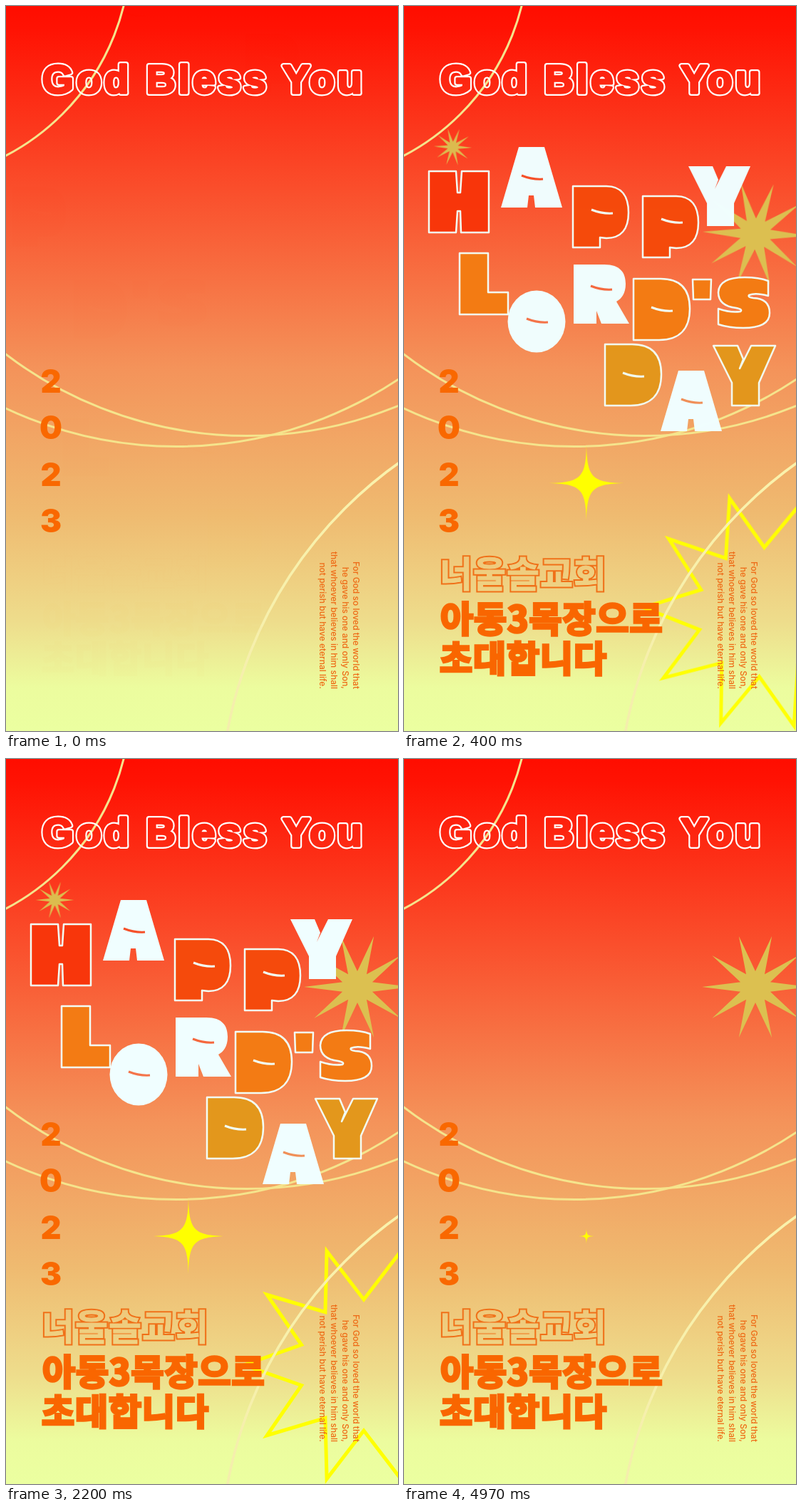
Animation, 550 px wide and 1018 px high, one loop 5.01 s. Source, as an HTML page:

```html
<!DOCTYPE html>
<html lang="ko">
<head>
<meta charset="utf-8">
<title>Happy Lord's Day</title>
<style>
  html, body { margin: 0; width: 100%; height: 100%; overflow: hidden; background: #ff0e00; }
  svg { display: block; width: 100vw; height: 100vh; }

  .arc { fill: none; stroke: #f5e48c; stroke-width: 3; }
  .title { font: bold 56px "Liberation Sans", Arial, sans-serif; letter-spacing: 4.6px; text-anchor: middle; stroke-linejoin: round; }
  .year { font: 900 45px Inter, "Noto Sans", sans-serif; text-anchor: middle; fill: #f96800; }
  .verse { font: 500 12px Inter, "Liberation Sans", sans-serif; text-anchor: end; fill: #ee6a16; }
  .korean { font: 900 50px "Noto Sans CJK KR", "Noto Sans CJK", sans-serif; letter-spacing: 1px; }
  .heavy { fill: #f96600; stroke: #f96600; stroke-width: 3.5; }

  .outlined { stroke: #f2fdf5; stroke-width: 2.5; stroke-linejoin: round; }
  .solid { fill: #f0feff; }
  .slit { fill: none; stroke-width: 3; }
  .outlined .slit { stroke: #f2fdf5; }

  .pan, .spin, .spin-in, .twinkle, .invite { animation: 5010ms linear infinite; }
  .pan { animation-name: pan, fade; }
  .spin { animation-name: spin; }
  .spin-in { animation-name: spin-in; }
  .twinkle { animation-name: twinkle; }
  .invite { animation-name: appear; }

  .right { --in: translate(-231px, 0); --out: translate(231px, 0); }
  .left { --in: translate(231px, 0); --out: translate(-231px, 0); }
  .down { --in: translate(0, -231px); --out: translate(0, 231px); }
  .up { --in: translate(0, 231px); --out: translate(0, -231px); }

  @keyframes pan {
    0% { transform: var(--in); animation-timing-function: cubic-bezier(.333, 1, .667, 1); }
    8.34% { transform: translate(0, 0); }
    84.43% { transform: translate(0, 0); animation-timing-function: cubic-bezier(.333, 0, .667, 0); }
    92.5%, 100% { transform: var(--out); }
  }
  @keyframes fade {
    0% { opacity: 0; animation-timing-function: cubic-bezier(.333, .667, .667, 1); }
    8.7%, 84.43% { opacity: 1; }
    91.9%, 100% { opacity: 0; }
  }
  @keyframes spin {
    0% { transform: rotate(180deg) scale(0); opacity: 0; animation-timing-function: cubic-bezier(.333, .667, .667, 1); }
    9% { transform: rotate(0deg) scale(1); opacity: 1; }
    84.43% { transform: rotate(0deg) scale(1); opacity: 1; animation-timing-function: cubic-bezier(.333, .667, .667, 1); }
    92.8%, 100% { transform: rotate(-180deg) scale(0); opacity: 0; }
  }
  @keyframes spin-in {
    0% { transform: rotate(180deg) scale(0); opacity: 0; animation-timing-function: cubic-bezier(.333, .667, .667, 1); }
    9%, 100% { transform: rotate(0deg) scale(1); opacity: 1; }
  }
  @keyframes twinkle {
    0% { transform: scale(0); animation-timing-function: cubic-bezier(.333, 1, .667, 1); }
    9% { transform: scale(1); }
    94.6% { transform: scale(1); animation-timing-function: cubic-bezier(.333, .15, .667, .5); }
    100% { transform: scale(0); }
  }
  @keyframes appear {
    0% { opacity: 0; }
    3.6%, 100% { opacity: 1; }
  }
</style>
</head>
<body>
<svg viewBox="0 0 550 1018" preserveAspectRatio="none">
  <defs>
    <linearGradient id="sky" x2="0" y2="1">
      <stop offset="0" stop-color="#ff0d00"/>
      <stop offset=".03" stop-color="#ff1203"/>
      <stop offset=".3" stop-color="#f95b34"/>
      <stop offset=".5" stop-color="#f4935a"/>
      <stop offset=".7" stop-color="#efba70"/>
      <stop offset=".85" stop-color="#eedd8c"/>
      <stop offset=".94" stop-color="#ecfc9e"/>
      <stop offset="1" stop-color="#ebffa0"/>
    </linearGradient>
    <linearGradient id="pale" gradientUnits="userSpaceOnUse" x1="0" y1="640" x2="0" y2="1018">
      <stop offset="0" stop-color="#faf2ac"/>
      <stop offset="1" stop-color="#f4eeac"/>
    </linearGradient>

    <!-- Each mask cuts the inside out of a thickened text, leaving its outline. -->
    <mask id="hollow-title" maskUnits="userSpaceOnUse" x="0" y="40" width="550" height="120">
      <rect y="40" width="550" height="120" fill="#fff"/>
      <text class="title" x="277.5" y="122" stroke="#000" stroke-width="3.6">God Bless You</text>
    </mask>
    <mask id="hollow-church" maskUnits="userSpaceOnUse" x="0" y="750" width="400" height="90">
      <rect y="750" width="400" height="90" fill="#fff"/>
      <text class="korean" x="50" y="816" stroke="#000" stroke-width="1">너울솔교회</text>
    </mask>

    <path id="A" d="M161 198H197L222 283H184L182 266H175L173 283H136Z"/>
    <path id="P" d="M237 253H284C306 253 315 268 315 290C315 314 304 326 284 326L275 325V339H237Z"/>
    <path id="Y" d="M399 225H433L441 244L436 257L452 225H486L463 277V309H425V277Z"/>
    <path id="D" d="M322 383H360C388 383 401 398 401 425C401 453 387 469 358 469H322Z"/>
    <path id="dash" class="slit" d="M-15 -3Q0 3 15 2"/>
  </defs>

  <rect width="550" height="1018" fill="url(#sky)"/>
  <circle class="arc" cx="-151" cy="-78.5" r="325.6"/>
  <circle class="arc" cx="338" cy="47.5" r="556"/>
  <circle class="arc" cx="239" cy="57.5" r="561"/>

  <g transform="translate(502 851)"><polygon class="spin" data-star="168 92" fill="none" stroke="#ff0" stroke-width="5" stroke-miterlimit="10"/></g>
  <circle class="arc" cx="895" cy="1126" r="594" style="stroke: url(#pale); stroke-width: 3.6"/>
  <g transform="translate(493 320)"><polygon class="spin-in" data-star="75 22" fill="#dcc050"/></g>
  <g transform="translate(68.5 198)"><polygon class="spin" data-star="27 7.5" fill="#dcbc4e"/></g>
  <g transform="translate(256 670)"><path class="twinkle" fill="#ff0" d="M0-53C1-8 8-1 53 0C8 1 1 8 0 53C-1 8-8 1-53 0C-8-1-1-8 0-53Z"/></g>

  <text class="title" x="277.5" y="122" fill="none" stroke="#fff" stroke-width="8" mask="url(#hollow-title)">God Bless You</text>

  <g class="year">
    <text x="63" y="543">2</text>
    <text x="63" y="608">0</text>
    <text x="63" y="674">2</text>
    <text x="63" y="739">3</text>
  </g>

  <g class="invite">
    <text class="korean" x="50" y="816" fill="none" stroke="#f07018" stroke-width="5" mask="url(#hollow-church)">너울솔교회</text>
    <text class="korean heavy" x="51" y="879">아동3목장으로</text>
    <text class="korean heavy" x="50" y="935">초대합니다</text>
  </g>

  <g class="verse">
    <text transform="translate(487 959) rotate(90)">For God so loved the world that</text>
    <text transform="translate(471.5 959) rotate(90)">he gave his one and only Son,</text>
    <text transform="translate(456 959) rotate(90)">that whoever believes in him shall</text>
    <text transform="translate(440 959) rotate(90)">not perish but have eternal life.</text>
  </g>

  <g role="img" aria-label="Happy Lord's Day">
    <g class="pan right outlined" fill="#f8360b">
      <path d="M35 232H73L75 262H79L81 232H119V318H80L79 288H75L73 318H35Z"/>
    </g>
    <g class="pan down solid">
      <use href="#A"/><use href="#dash" x="180" y="241" stroke="#f5512a"/>
    </g>
    <g class="pan right outlined" fill="#f54a0c">
      <use href="#P"/><use href="#dash" x="278" y="289"/>
    </g>
    <g class="pan down outlined" fill="#f54a0c">
      <use href="#P" x="98" y="14"/><use href="#dash" x="376" y="302"/>
    </g>
    <g class="pan left solid"><use href="#Y"/></g>

    <g class="pan up outlined" fill="#f37b14">
      <path d="M78 347H118V402H146V433H78Z"/>
    </g>
    <g class="pan right solid">
      <ellipse cx="186" cy="443" rx="40.5" ry="43.5"/><use href="#dash" x="187" y="442" stroke="#f4744a"/>
    </g>
    <g class="pan right outlined" fill="#f37b14">
      <use href="#D"/><use href="#dash" x="362" y="426"/>
      <path d="M405 384H431L430 412H406Z"/>
      <path d="M511 386V407Q493 402 484 406Q482 409 490 410Q513 411 513 431Q513 452 476 452Q456 452 441 447V425Q458 431 472 429Q476 426 466 424Q441 421 441 402Q442 381 478 381Q498 381 511 386Z"/>
    </g>
    <g class="pan up solid">
      <path d="M238 363H281C304 363 311 375 311 390C311 404 305 411 298 415L316 446H277L270 428V446H238Z"/>
      <use href="#dash" x="277" y="396" stroke="#f5683e"/>
    </g>

    <g class="pan up outlined" fill="#e3971c">
      <use href="#D" x="-40" y="92"/><use href="#dash" x="322" y="518"/>
    </g>
    <g class="pan right solid">
      <use href="#A" x="224" y="314"/><use href="#dash" x="404" y="555" stroke="#f09058"/>
    </g>
    <g class="pan left outlined" fill="#e3971c"><use href="#Y" x="35" y="252"/></g>
  </g>
</svg>
<script>
  // Ten-pointed stars, alternating outer and inner radius.
  for (const star of document.querySelectorAll('[data-star]')) {
    const radii = star.dataset.star.split(' ').map(Number);
    const points = Array.from({ length: 20 }, (_, i) => {
      const angle = i * Math.PI / 10;
      const r = radii[i % 2];
      return [r * Math.cos(angle), r * Math.sin(angle)].map(v => v.toFixed(2)).join();
    });
    star.setAttribute('points', points.join(' '));
  }
</script>
</body>
</html>
```
